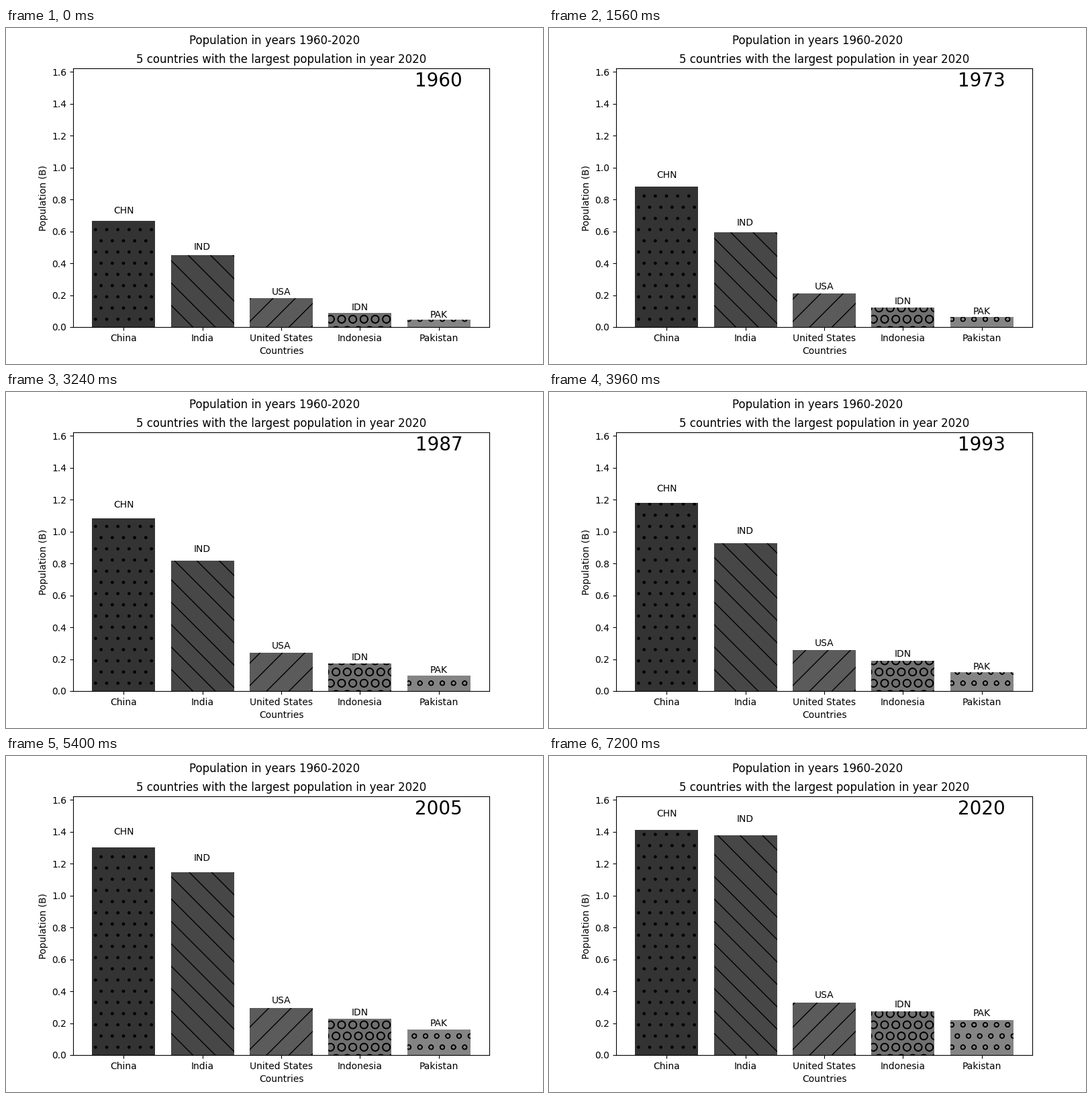
A matplotlib script for the animation above (7.32 s loop, 800 by 500 pixels).

```python
import numpy as np
import matplotlib.pyplot as plt
from matplotlib.animation import FuncAnimation

FIRST, LAST = 1960, 2020
STEP_MS = 120
LABEL_GAP = 1.05

COUNTRIES = ["China", "India", "United States", "Indonesia", "Pakistan"]
CODES = ["CHN", "IND", "USA", "IDN", "PAK"]
GREYS = ["#333333", "#474747", "#5b5b5b", "#707070", "#848484"]
HATCHES = [".", "\\", "/", "O", "o"]

years = np.arange(FIRST, LAST + 1)


def smooth_curve(*keys):
    """Polynomial through evenly spaced populations, in millions."""
    t = np.linspace(-1, 1, len(keys))
    curve = np.polyfit(t, keys, len(keys) - 1)
    return np.polyval(curve, np.linspace(-1, 1, len(years)))


def summed_growth(start, rates):
    """Population built up from yearly growth that bends at a few years."""
    growth = np.interp(years[1:], list(rates), list(rates.values()))
    return start + np.concatenate([[0], np.cumsum(growth)])


population = np.array([
    summed_growth(667.1, {1961: -6.7, 1963: 16.3, 1971: 22.6, 1978: 12,
                          1981: 12.7, 1988: 17.6, 1992: 14.6, 2005: 7.3,
                          2010: 6.4, 2013: 9.2, 2020: 5.3}),
    smooth_curve(450.5, 623.1, 873.2, 1147.6, 1380),
    smooth_curve(180.7, 216, 250, 295.5, 329.5),
    smooth_curve(87.8, 130.7, 181.4, 226.3, 273.5),
    smooth_curve(45, 66.8, 107.4, 160.3, 220.9),
]) / 1000
peak = population.max()

plt.rcParams["font.family"] = "DejaVu Sans"
fig, ax = plt.subplots(figsize=(8, 5), dpi=100)
fig.suptitle("Population in years 1960-2020")
ax.set_title("5 countries with the largest population in year 2020")
ax.set_xlabel("Countries")
ax.set_ylabel("Population (B)")

bars = ax.bar(COUNTRIES, population[:, 0], color=GREYS, hatch=HATCHES)
ax.set_ylim(0, peak * 1.15)
labels = [ax.text(i, 0, code, ha="center", va="bottom")
          for i, code in enumerate(CODES)]
year_text = ax.text(4, peak * LABEL_GAP, "", fontsize=20, ha="center", va="bottom")


def draw(frame):
    for bar, label, value in zip(bars, labels, population[:, frame]):
        bar.set_height(value)
        label.set_y(value * LABEL_GAP)
    year_text.set_text(str(years[frame]))
    return [*bars, *labels, year_text]


anim = FuncAnimation(fig, draw, frames=len(years), interval=STEP_MS,
                     repeat=True, repeat_delay=0)
plt.show()
```
